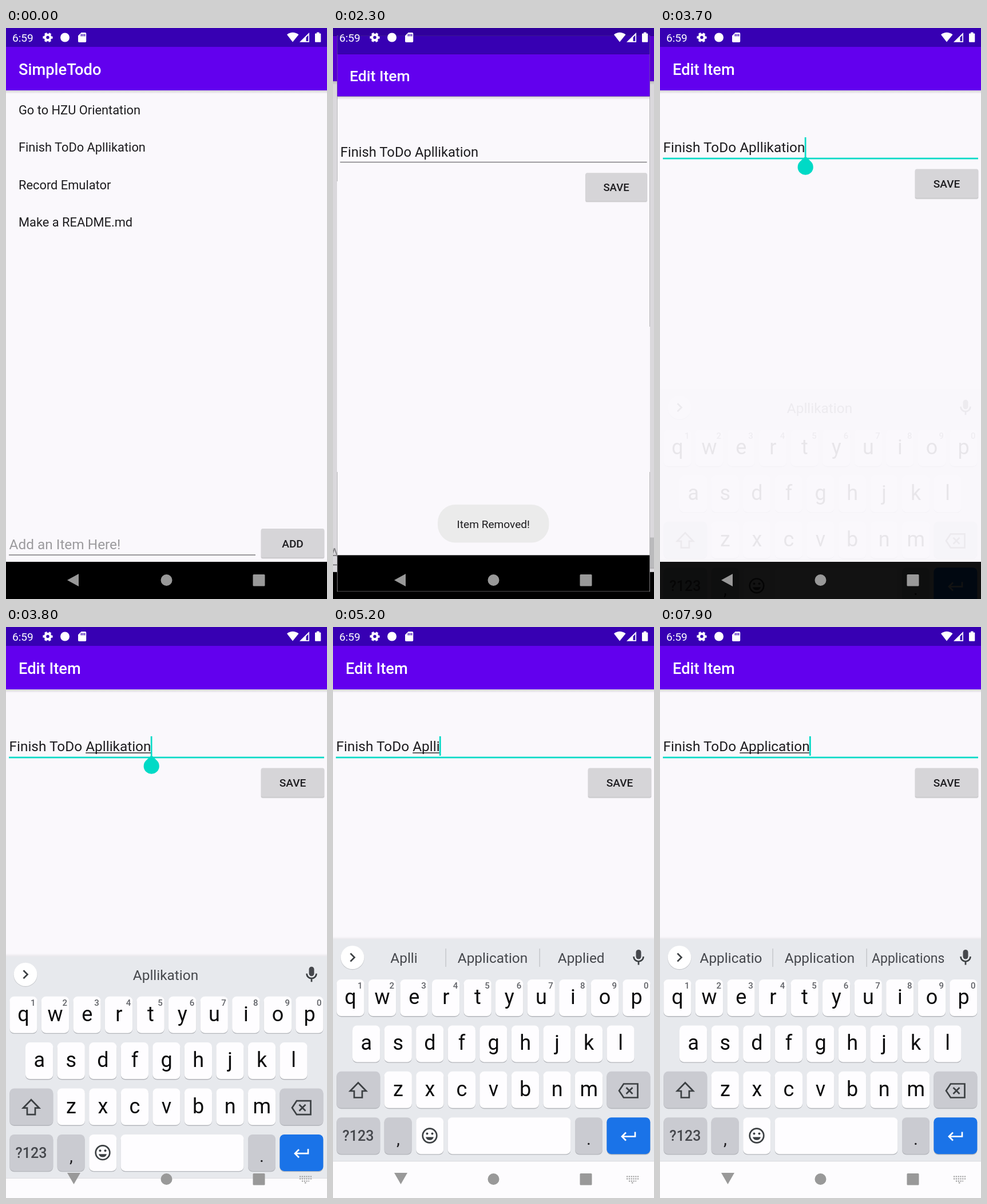
An HTML page for the animation above (8 s loop, 561 by 998 pixels).

```html
<!DOCTYPE html>
<html lang="en">
<head>
<meta charset="utf-8">
<title>Todo list</title>
<style>
html, body { margin: 0; width: 100%; height: 100%; overflow: hidden; background: #000; }
svg { display: block; width: 561px; height: 998px; }
text { font: 400 24.4px Roboto, sans-serif; fill: #1d1c1f; white-space: pre; }
.title { font-size: 27.3px; font-weight: 500; fill: #fff; }
.item { font-size: 21.84px; }
.button { font-size: 19.1px; font-weight: 500; text-anchor: middle; }
.small { font-size: 19.1px; }
.mid { text-anchor: middle; }
.hint { fill: #9c9b9e; }
.key { font-size: 36px; fill: #0c0c0d; text-anchor: middle; }
.digit { font-size: 15px; font-weight: 500; fill: #5f6166; text-anchor: middle; }
.word { fill: #45474c; text-anchor: middle; }
.line { fill: none; stroke: #3c4043; stroke-width: 2.7; }
.teal { fill: #00dac6; }

#list, #dim, #edit, #first, #rest, #toast, #keyboard { animation: 8s linear infinite; }
#list, #edit { transform-origin: 280.5px 499px; }
#list { animation-name: list-out; }
#dim { animation-name: dim; }
#edit { animation-name: edit-in, edit-fade; }
#first { animation-name: remove; }
#rest { animation-name: shift-up; }
#toast { animation-name: toast; }
#keyboard { animation-name: slide, keyboard-fade; }

@keyframes remove { 0%, 6.13% { opacity: 1 } 7.63%, 100% { opacity: 0 } }
@keyframes shift-up {
  0%, 7.63% { transform: none; animation-timing-function: ease-in-out }
  10.75%, 100% { transform: translateY(-65.5px) }
}
@keyframes toast { 0%, 6.9% { opacity: 0 } 10.6%, 30.6% { opacity: 1 } 36%, 100% { opacity: 0 } }
@keyframes list-out {
  0%, 27.06% { transform: none; animation-timing-function: cubic-bezier(.3, 0, .8, .15) }
  28.06% { transform: scale(1.02); animation-timing-function: cubic-bezier(.05, .7, .1, 1) }
  33.06%, 100% { transform: scale(1.05) }
}
@keyframes dim { 0%, 27.06% { opacity: 0 } 28.3%, 100% { opacity: .13 } }
@keyframes edit-in {
  0%, 27.06% { transform: scale(.85); animation-timing-function: cubic-bezier(.3, 0, .8, .15) }
  28.06% { transform: scale(.91); animation-timing-function: cubic-bezier(.05, .7, .1, 1) }
  33.06%, 100% { transform: none }
}
@keyframes edit-fade { 0%, 27.6% { opacity: 0 } 28.3%, 100% { opacity: 1 } }
@keyframes slide {
  0%, 46.19% { transform: translateY(90px); animation-timing-function: cubic-bezier(.33, .67, .67, 1) }
  49.31%, 100% { transform: none }
}
@keyframes keyboard-fade { 0%, 46.19% { opacity: 0 } 47.2%, 100% { opacity: 1 } }
</style>
</head>
<body>
<svg viewBox="0 0 561 998">
  <defs>
    <linearGradient id="shade" x2="0" y2="1">
      <stop stop-color="#000" stop-opacity=".16"/>
      <stop offset="1" stop-color="#000" stop-opacity="0"/>
    </linearGradient>
    <g id="screen">
      <rect width="561" height="998"/>
      <rect y="109" width="561" height="824" fill="#faf8fc"/>
      <rect y="109" width="561" height="6" fill="url(#shade)"/>
      <rect y="33" width="561" height="76" fill="#6200ee"/>
      <rect width="561" height="33" fill="#3700b3"/>
    </g>
    <g id="plate">
      <rect x="-.8" y=".6" width="111.6" height="52.4" rx="3.5" opacity=".07"/>
      <rect x="-.2" y="1" width="110.4" height="51" rx="3" opacity=".14"/>
      <rect width="110" height="50.5" rx="2.7" fill="#d6d5d8"/>
    </g>
  </defs>

  <g id="list">
    <use href="#screen"/>
    <text class="title" x="22" y="81.5">SimpleTodo</text>
    <text class="item" id="first" x="22" y="150.5">Go to HZU Orientation</text>
    <g id="rest">
      <text class="item" x="22" y="216">Finish ToDo Apllikation</text>
      <text class="item" x="22" y="281.5">Record Emulator</text>
      <text class="item" x="22" y="347">Make a README.md</text>
    </g>
    <text class="hint" x="5.5" y="911">Add an Item Here!</text>
    <rect x="5" y="920.3" width="431" height="1.5" fill="#7b7a7d"/>
    <use href="#plate" x="446" y="875"/>
    <text class="button" x="501" y="907.5">ADD</text>
  </g>
  <rect id="dim" width="561" height="998"/>

  <g id="edit">
    <use href="#screen"/>
    <text class="title" x="22" y="81.5">Edit Item</text>
    <text id="field" x="5.5" y="217">Finish ToDo <tspan id="word">Apllikation</tspan></text>
    <rect id="rule" x="5" width="551"/>
    <rect id="spell" y="219.3" height="1.4" fill="#1d1c1f"/>
    <rect id="caret" class="teal" y="191" width="2.7" height="34"/>
    <path id="handle" class="teal" d="M0 0L9.6 9.6A13.6 13.6 0 1 1-9.6 9.6Z"/>
    <use href="#plate" x="446" y="246.5"/>
    <text class="button" x="501" y="278.7">SAVE</text>
  </g>

  <g id="keyboard">
    <rect y="541" width="561" height="6" fill="url(#shade)" transform="matrix(1 0 0 -1 0 1088)" opacity=".5"/>
    <rect y="546" width="561" height="388" fill="#e7e9ed"/>
    <rect y="933" width="561" height="166" fill="#fdfcfe"/>
    <rect y="933" width="561" height="1.3" fill="#dcdde0"/>
    <circle cx="34" cy="578.5" r="20.7" fill="#c5c7cb"/>
    <circle cx="34" cy="577.5" r="20.5" fill="#fff"/>
    <path class="line" d="M30.5 570.5l7 7-7 7"/>
    <g id="dividers" fill="#c0c2c6">
      <rect x="196.5" y="562" width="1.3" height="32"/>
      <rect x="360.5" y="562" width="1.3" height="32"/>
    </g>
    <text class="word" x="124" y="587"></text>
    <text class="word" x="279" y="587"></text>
    <text class="word" x="433.7" y="587"></text>
    <rect x="529.5" y="564" width="9" height="16.5" rx="4.5" fill="#45474c"/>
    <path class="line" d="M525.5 576a8.5 8.5 0 0 0 17 0M534 584.5v6" stroke-width="2.2"/>
    <g id="keys"></g>
    <path class="line" d="M44 796.5L58 811H51V822.5H37V811H30Z"/>
    <path class="line" d="M508 798.5H532.5V822.5H508L500 810.5ZM512.5 805l11 11M523.5 805l-11 11"/>
    <circle class="line" cx="169" cy="889" r="12.3"/>
    <g fill="#3c4043">
      <circle cx="164.5" cy="885.5" r="2"/>
      <circle cx="173.5" cy="885.5" r="2"/>
      <path d="M162 891.5h14a7.3 7.3 0 0 1-14 0Z"/>
    </g>
    <path class="line" d="M528 882.5V890.5H505M512 883.5l-7 7 7 7" style="stroke:#fff"/>
    <text class="mid" x="44" y="898" style="font-size:25px;font-weight:500;fill:#45474c">?123</text>
    <text class="mid" x="114" y="905" style="font-size:30px">,</text>
    <text class="mid" x="447" y="905" style="font-size:30px">.</text>
  </g>

  <g id="toast">
    <rect x="183" y="833" width="194.5" height="66.5" rx="31" fill="#ebebeb"/>
    <text class="small mid" x="280.3" y="874">Item Removed!</text>
  </g>

  <g fill="#fff">
    <text class="small" x="11" y="24" style="fill:#fff">6:59</text>
    <circle cx="73" cy="16.5" r="4.7" fill="none" stroke="#fff" stroke-width="4"/>
    <circle cx="73" cy="16.5" r="7.3" fill="none" stroke="#fff" stroke-width="2.6" stroke-dasharray="4.2 3.444" stroke-dashoffset="2.1"/>
    <circle cx="103" cy="16.5" r="8"/>
    <path d="M131.5 8H138.5a1.7 1.7 0 0 1 1.7 1.7V23.3a1.7 1.7 0 0 1-1.7 1.7H127.7a1.7 1.7 0 0 1-1.7-1.7V13.5Z"/>
    <path d="M131.5 10.5v4M134.5 10.5v4M137.5 10.5v4" stroke="#3700b3" stroke-width="1.6"/>
    <path d="M501 24.5L491 11.5Q501 4 511.5 11.5Z"/>
    <path d="M513 24.7L530 8V24.7ZM524.5 16.5V23H528.3V12.5Z" fill-rule="evenodd"/>
    <path d="M543 7.5h4.5v2h1.8q1 0 1 1V23.8q0 1-1 1H541q-1 0-1-1V10.5q0-1 1-1h2Z"/>
  </g>
  <g fill="#999">
    <path id="back" d="M107 965L127 954V976Z"/>
    <circle cx="280.5" cy="965" r="10"/>
    <rect x="431.5" y="955" width="21" height="20.5" rx="1.5"/>
    <path id="switcher" fill="none" stroke="#999" stroke-width="2" stroke-dasharray="2.2 1.6" d="M513 960.5H534M513 964.5H534M517 968.5H530M522 971.5h4"/>
  </g>
</svg>
<script>
const $ = id => document.getElementById(id);
const show = (id, on) => $(id).setAttribute('visibility', on ? 'inherit' : 'hidden');
const set = (id, attrs) => Object.entries(attrs).forEach(([k, v]) => $(id).setAttribute(k, v));

const PITCH = 55.55, ROW = 80.4, TOP = 616;
const rowY = row => TOP + row * ROW;
const cap = (x, row, w, fill) =>
  `<rect x="${x}" y="${rowY(row) + 1.4}" width="${w}" height="64" rx="8" fill="#b4b6bb"/>` +
  `<rect x="${x}" y="${rowY(row)}" width="${w}" height="64" rx="8" fill="${fill}"/>`;

function buildKeys() {
  const white = '#fefdff', grey = '#cacbd1';
  let out = '';
  [['qwertyuiop', 6.3], ['asdfghjkl', 34], ['zxcvbnm', 89.6]].forEach(([letters, left], row) => {
    [...letters].forEach((letter, i) => {
      const x = left + i * PITCH;
      out += cap(x, row, 48.3, white) +
        `<text class="key" x="${x + 24.3}" y="${rowY(row) + 43}">${letter}</text>`;
      if (!row) out += `<text class="digit" x="${x + 41}" y="${TOP + 16}">${(i + 1) % 10}</text>`;
    });
  });
  out += cap(6.3, 2, 76, grey) + cap(478.4, 2, 76, grey);
  out += cap(6.3, 3, 76, grey) + cap(89.6, 3, 48, grey) + cap(145.2, 3, 48, white);
  out += cap(200.5, 3, 215, white) + cap(423, 3, 48, grey) + cap(478.4, 3, 76, '#1a73e8');
  $('keys').innerHTML = out;
}

const LOOP = 8000, FOCUS = 3400, OPEN = 3720, LAG = 70;
const START = 'Apllikation', ADDED = 'plication';
const deletes = [4300, 4480, 4800, 4900, 5000, 5100, 5280, 5400, 5500];
const inserts = [5750, 5980, 6250, 6600, 6850, 7100, 7300, 7550, 7850];
const count = (times, t) => times.filter(at => at <= t).length;
const wordAt = t =>
  START.slice(0, START.length - count(deletes, t)) + ADDED.slice(0, count(inserts, t));

function suggest(word) {
  if (word === START) return ['', word, ''];
  if (word.length < 3) return [word, 'Apart', 'April'];
  if (word.length < 5) return [word, 'Apply', 'Applied'];
  return [word, 'Application', word.length < 6 ? 'Applied' : 'Applications'];
}

const slots = document.querySelectorAll('.word');

function render(t) {
  const focused = t >= FOCUS, open = t >= OPEN, editing = t >= deletes[0];
  $('word').textContent = wordAt(t);
  const end = 5.5 + $('field').getComputedTextLength();
  const width = $('word').getComputedTextLength();

  set('rule', focused ? { y: 226.7, height: 2.7, fill: '#00dac6' } : { y: 226.5, height: 1.5, fill: '#7b7a7d' });
  set('spell', { x: end - width, width });
  set('caret', { x: end - .7 });
  set('handle', { transform: `translate(${end + .7} 224)` });
  show('spell', open);
  show('caret', focused && (editing || t < FOCUS + 600));
  show('handle', t >= FOCUS + 100 && !editing);

  const words = suggest(wordAt(t - LAG));
  slots.forEach((slot, i) => {
    slot.textContent = words[i];
    slot.style.fontSize = words[i].length > 11 ? '23px' : '';
  });
  show('dividers', words[0]);
  show('switcher', open);
  set('back', { d: open ? 'M107 954H130L118.5 974Z' : 'M107 965L127 954V976Z' });
}

buildKeys();
let origin;
function tick(now) {
  origin ??= now;
  render((now - origin) % LOOP);
  requestAnimationFrame(tick);
}
render(0);
requestAnimationFrame(tick);
</script>
</body>
</html>
```
